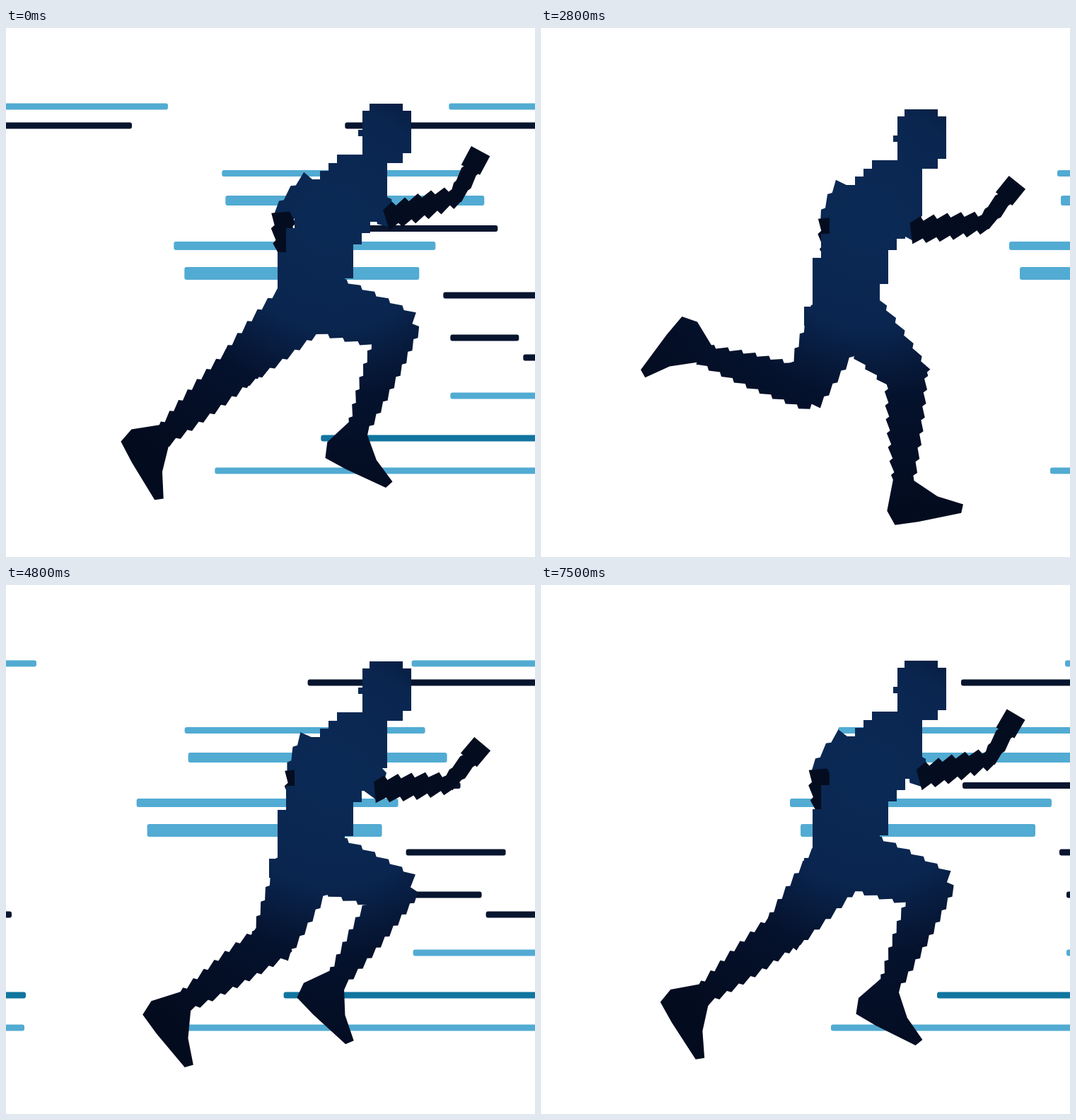
An HTML page with a canvas for the animation above (7600 ms loop, 748 by 748 pixels).

```html
<!DOCTYPE html>
<html lang="en">
<head>
<meta charset="utf-8">
<title>Runner</title>
<style>
html, body { margin: 0; width: 100%; height: 100%; overflow: hidden; background: #fff; }
canvas { display: block; width: 748px; height: 748px; }
</style>
</head>
<body>
<canvas id="stage" width="748" height="748"></canvas>
<script>
const ctx = document.getElementById('stage').getContext('2d');
const TICK = 100, TICKS = 76;
const STEP = 4.42;      // ticks per running step
const CONTACT = 28;     // tick at which a foot lands
const SPEED = 62;       // streak pixels per tick
const THIGH = 130, SHIN = 150;
const DARK = '#040d20';

// y, x, width, height
const streaks = {
  '#52abd2': [[111, 555, 232], [205.5, 234, 340], [244, 239, 366, 14], [308, 166, 370, 12],
    [347, 181, 332, 18], [520, 557, 184], [626, 224, 546]],
  '#08152f': [[138, 408, 328], [283.5, 410, 214], [378, 547, 141], [438, 557, 97], [466, 660, 92]],
  '#11759f': [[580, 374, 398]]
};
const waves = [-9, 1.15, 36, 48.3, 78];  // ticks at which a wave stands at its x

// Foot path over two steps: phase, ankle x, ankle y, foot angle
const stride = [
  [0, 513, 640, -6], [.06, 499, 640, -5], [.24, 316, 614, 35], [.6, 238, 582, 61],
  [.81, 198, 560, 71], [.9, 190, 502, 125], [1, 232, 463, 132], [1.06, 240, 465, 132],
  [1.24, 395, 525, 101], [1.6, 489, 565, 34], [1.81, 520, 565, 22], [2, 513, 640, -6]
];
const shoe = [[-14, -6], [-28, 40], [-19, 61], [14, 60], [76, 54], [80, 42], [45, 27], [15, 2]];

const ink = ctx.createRadialGradient(465, 270, 0, 465, 270, 420);
ink.addColorStop(0, '#0a2a55');
ink.addColorStop(.36, '#0a2650');
ink.addColorStop(.6, '#05122d');
ink.addColorStop(1, '#030b1e');

const mod = (a, b) => ((a % b) + b) % b;
const mix = (a, b, t) => a + (b - a) * t;
const wave = (p, peak) => Math.cos(2 * Math.PI * (p - peak));
const dist = (a, b) => Math.hypot(b[0] - a[0], b[1] - a[1]);

// Point at fraction t from a to b, moved sideways by off pixels
function along(a, b, t, off = 0) {
  const len = dist(a, b);
  return [
    mix(a[0], b[0], t) - (b[1] - a[1]) / len * off,
    mix(a[1], b[1], t) + (b[0] - a[0]) / len * off
  ];
}

function sample(keys, t) {
  const i = Math.max(1, keys.findIndex(k => k[0] >= t));
  const a = keys[i - 1], b = keys[i];
  return a.map((v, j) => mix(v, b[j], (t - a[0]) / (b[0] - a[0])));
}

function fill(points, color = ink) {
  ctx.fillStyle = color;
  ctx.beginPath();
  points.forEach(p => ctx.lineTo(p[0], p[1]));
  ctx.fill();
}

// Tapered limb with ragged edges, reaching a little past both joints
function limb(a, b, wa, wb, color, tooth = 2.5) {
  const len = dist(a, b), t0 = -wa * .25 / len, t1 = 1 + wb * .3 / len;
  const count = Math.max(2, Math.round(len / 17));
  const left = [], right = [];
  for (let i = 0; i < count; i++) {
    for (const [k, off] of [[i, tooth], [i + .8, -tooth]]) {
      const s = k / (count - .2), t = mix(t0, t1, s);
      const half = mix(wa, wb, s) / 2 + 3 * Math.sin(Math.PI * s);
      left.push(along(a, b, t, half + off));
      right.unshift(along(a, b, t, -half + off));
    }
  }
  fill(left.concat(right), color);
}

// Knee from two bones; the leg stretches when the foot is out of reach
function kneeOf(hip, ankle) {
  const d = dist(hip, ankle);
  const near = Math.min((THIGH ** 2 - SHIN ** 2 + d * d) / (2 * d), d * THIGH / (THIGH + SHIN));
  const bend = Math.sqrt(Math.max(0, THIGH ** 2 - near ** 2));
  return along(hip, ankle, near / d, d < THIGH + SHIN ? -bend : 0);
}

function leg(hip, phase) {
  const [, x, y, angle] = sample(stride, phase);
  const ankle = [x, y], knee = kneeOf(hip, ankle);
  limb(hip, knee, 88, 56);
  limb(knee, ankle, 58, 27);
  const c = Math.cos(angle * Math.PI / 180), s = Math.sin(angle * Math.PI / 180);
  fill(shoe.map(([u, v]) => [x + u * c - v * s, y + u * s + v * c]));
}

function backArm(top, swing) {
  const pass = Math.max(0, swing) ** 4;
  const elbow = [411 + 25 * swing, top + 160 + 40 * pass];
  const hand = [elbow[0] + 4 + 72 * pass, top + 206 + 62 * pass];
  limb([430, top + 115], elbow, 32, 26);
  limb(elbow, hand, 26, 24, DARK);
}

function frontArm(top, swing) {
  const elbow = [528 - 20 * swing, 290 + 30 * swing];
  const hand = [664 - 58 * Math.max(0, swing) ** 2, 238 + 64 * swing];
  const wrist = along(elbow, hand, .65, .19 * dist(elbow, hand));
  limb([490, top + 120], elbow, 36, 30);
  limb(elbow, wrist, 30, 22, DARK, 3.5);
  limb(wrist, hand, 18, 18, DARK, 1);
  const grip = 15 / dist(wrist, hand);
  fill([[-1, -1], [1, -1], [1, 1], [-1, 1]].map(([u, v]) => along(wrist, hand, 1 + u * grip, v * 15)), DARK);
}

function torso(top) {
  ctx.fillStyle = ink;
  ctx.fillRect(514, top, 47, 84);
  ctx.fillRect(504, top + 10, 69, 60);
  ctx.fillRect(498, top + 37, 8, 9);
  ctx.fillRect(504, top + 60, 57, 24);
  for (let y = 72; y < 306; y++) {
    const row = Math.floor((y - 72) / 11.5) * 11.5;
    const back = 372 + 12 * Math.round((99 * Math.exp(-row / 88) - 4) / 12);
    const cut = Math.min(4, Math.max(0, Math.ceil((y - 150) / 16))) + (y > 246);
    ctx.fillRect(back, top + y, 539 - 12 * cut - back, 1);
  }
}

function runner(tick) {
  const p = mod((tick - CONTACT) / STEP, 1);
  const top = Math.round(111.7 + 5.2 * wave(p, .15));
  const swing = wave(p, .27);
  const hip = [431, top + 277];
  backArm(top, swing);
  leg(hip, p + 1);
  leg(hip, p);
  torso(top);
  frontArm(top, swing);
}

function drawStreaks(tick) {
  for (const at of waves) {
    for (const [color, rows] of Object.entries(streaks)) {
      ctx.fillStyle = color;
      for (const [y, x, w, h = 9] of rows) {
        if (at < 0 && y > 200) continue;  // only the top streaks linger
        ctx.beginPath();
        ctx.roundRect(x - SPEED * (tick - at), y - h / 2, w, h, 3);
        ctx.fill();
      }
    }
  }
}

function draw(tick) {
  ctx.fillStyle = '#fff';
  ctx.fillRect(0, 0, 748, 748);
  drawStreaks(tick);
  runner(tick);
}

const start = performance.now();
function loop() {
  draw(Math.floor((performance.now() - start) / TICK) % TICKS);
  requestAnimationFrame(loop);
}
loop();
</script>
</body>
</html>
```
